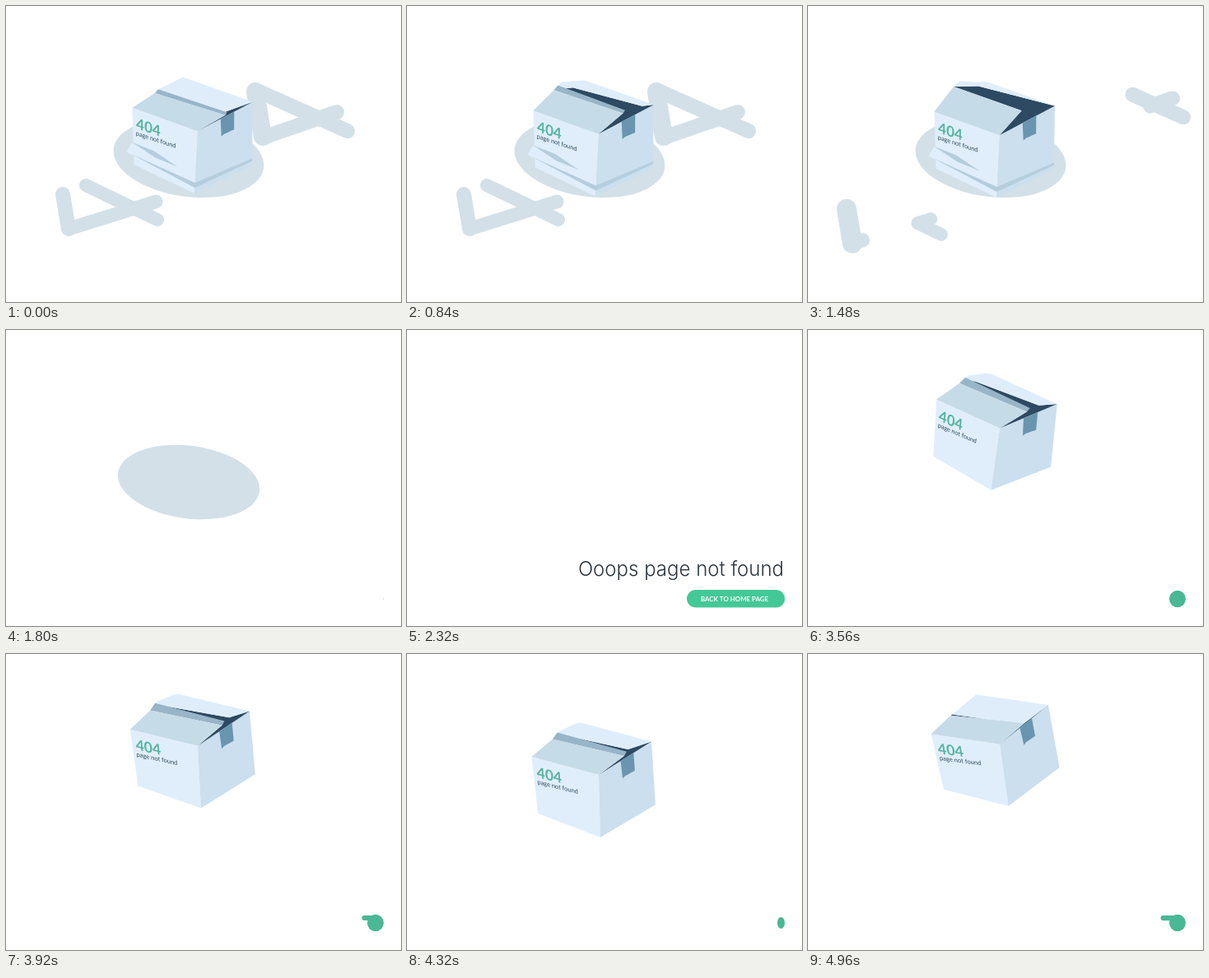
Animation of 480x360 px, one loop 5000 ms. Source, as an HTML page with a canvas:

```html
<!DOCTYPE html>
<html lang="en">
<head>
<meta charset="utf-8">
<title>Page not found</title>
<style>
  html, body { margin: 0; width: 100%; height: 100%; overflow: hidden; background: #fff; }
  canvas { display: block; }
</style>
</head>
<body>
<canvas id="stage" width="480" height="360"></canvas>
<script>
const ctx = document.getElementById('stage').getContext('2d');
const LOOP = 5000, FLOOR = 161, SHADOW = '#d3e0e8';

const clamp = x => Math.max(0, Math.min(1, x));
const span = (t, a, b) => clamp((t - a) / (b - a));
const mix = (a, b, k) => a + (b - a) * k;
const smooth = k => k * k * (3 - 2 * k);

// Smooth interpolation through [time, value] keys
function keyed(keys, t) {
  let i = 1;
  while (i < keys.length - 1 && t > keys[i][0]) i++;
  const [a, b] = [keys[i - 1], keys[i]];
  return mix(a[1], b[1], smooth(span(t, a[0], b[0])));
}

const TILT = [[2320, 6], [2880, -6], [3560, 8], [4140, -8], [4500, 5], [4960, -8], [5000, -8]];
const FLAPS = [[0, .18], [1300, 1], [1760, 1], [2320, .3], [2880, .4], [3560, .6], [4320, .4], [4960, 0]];
const HOPS = [[2880, 3750, 61], [3750, 4358, 61], [4358, 5093, 87]];

function boxHeight(t) {
  if (t < 2880) return 245 * (1 - span(t, 2320, 2880) ** 2);
  const [a, b, top] = HOPS.find(h => t < h[1]);
  const k = span(t, a, b);
  return 4 * top * k * (1 - k);
}

function poly(color, ...points) {
  ctx.fillStyle = color;
  ctx.beginPath();
  points.forEach(p => ctx.lineTo(...p));
  ctx.closePath();
  ctx.fill();
}

function type(text, x, y, font, color) {
  ctx.font = font;
  ctx.fillStyle = color;
  ctx.fillText(text, x, y);
}

// The origin is the top of the box's near edge
function drawBox(x, y, tilt, open, grounded) {
  const left = [-81, -24], near = [0, 0], right = [65, -39], back = [-20, -64];
  const lowLeft = [-75, 45], low = [0, 76], lowRight = [68, 38];
  const wide = open * open, lift = 30 * open - 11 * wide, band = 4 * open * (1 - open);
  const frontL = [-54 - 5 * wide, -43 - 13 * wide], frontR = [33 - 8 * wide, -21 - 10 * wide];
  const backL = [-52 + 23 * open, -44 - 14 * open], backR = [31 + 34 * wide, -20 - lift];
  const outer = [-52 + 5 * band, -44 - lift], corner = [mix(-20, -32, open), -64 + open];

  ctx.save();
  ctx.translate(x, y);
  ctx.rotate(tilt * Math.PI / 180);
  poly('#e0eefb', left, near, low, lowLeft);
  poly('#cbdfee', near, right, lowRight, low);
  if (grounded) {
    poly('#e0eefb', [-79, 18], [-85, 30], [0, 70], [0, 60]);
    poly('#b5cddd', [-79, 18], [-52, 27], [-22, 45], [-50, 35]);
    poly('#b5cddd', [-80, 32], [0, 63], [68, 30], [68, 33], [0, 69]);
  }
  poly('#2e4a62', frontL, frontR, near, right, backR, backL);
  poly('#dfedfb', back, right, backR, backL, frontL, outer, corner);
  poly('#98b5c8', frontL, [frontL[0] + 6 * band, frontL[1] - 8 * band],
    [frontR[0] + 3 * band, frontR[1] - 5 * band], frontR);
  poly('#c6dbe8', left, frontL, frontR, near);
  poly('#6a95ae', [27, -16], [43, -26], [44, -4], [40, -2], [36, 0], [32, 2], [29, 5]);

  ctx.transform(.96, .26, .03, 1, -75, 1);
  ctx.textAlign = 'left';
  type('404', 0, 0, 'bold 18px Lato, sans-serif', '#57b4a0');
  type('page not found', 0, 8, '7.7px Lato, sans-serif', '#2f4a5f');
  ctx.restore();
}

// Part of a thick stroke, from fraction p to fraction q
function stroke([x1, y1], [x2, y2], width, p, q) {
  if (q <= p || width <= 0) return;
  ctx.lineWidth = width;
  ctx.beginPath();
  ctx.moveTo(mix(x1, x2, p), mix(y1, y2, p));
  ctx.lineTo(mix(x1, x2, q), mix(y1, y2, q));
  ctx.stroke();
}

function drawFours(t) {
  const k = span(t, 1200, 1720), gone = clamp(k / .54), thin = 1 - clamp((k - .54) / .44);
  ctx.strokeStyle = SHADOW;
  ctx.lineCap = 'round';

  ctx.save();
  ctx.translate(-41 * k, 33 * k);
  const foot = [76, 271], tip = [182, 238];
  stroke([69, 229], foot, mix(18, 24, gone) * thin, 0, 1);
  stroke(foot, tip, 17 * thin, 0, 1 - .88 * gone);
  if (gone > .1) stroke(foot, tip, 16 * thin, .75 * gone, 1 - .1 * gone);
  stroke([97, 218], [184, 260], 16 * thin, .68 * gone, 1);
  ctx.restore();

  ctx.save();
  ctx.translate(76 * k, -31 * k);
  stroke([303, 104], [312, 159], 22 * thin, gone, 1);
  stroke([303, 102], [415, 152], 18 * thin, .45 * gone, 1);
  stroke([312, 160], [402, 129], 18 * thin, .7 * gone, 1);
  ctx.restore();
}

function zeroPath(scale) {
  ctx.ellipse(222, 185, 92 * scale, 47 * scale, .13, 0, Math.PI * 2);
}

// Circle first, then the pill with its label, then the heading
function drawMessage(level) {
  const size = clamp(level / 31), grow = clamp((level - 46) / 50);
  if (size <= 0) return;
  const rx = 10 * size, ry = 10.3 * Math.sqrt(size);
  ctx.fillStyle = grow > .3 ? '#44c898' : '#4ab795';
  ctx.beginPath();
  ctx.ellipse(459 - rx, 327, rx, ry, 0, 0, Math.PI * 2);
  ctx.fill();
  if (grow > 0) {
    const swell = clamp(grow * 2 - .2);
    const width = 20 + 99 * grow, height = 6 + 15.5 * swell;
    ctx.beginPath();
    ctx.roundRect(459 - width, 318 - 2 * swell, width - 10 * (1 - swell), height, height / 2);
    ctx.fill();
  }
  ctx.save();
  ctx.globalAlpha = clamp((level - 85) / 20);
  ctx.textAlign = 'center';
  type('BACK TO HOME PAGE', 398, 329.5, 'bold 7.9px Lato, sans-serif', '#fff');
  ctx.restore();

  const shown = clamp((level - 100) / 100);
  if (!shown) return;
  ctx.save();
  ctx.beginPath();
  ctx.rect(196, 270, 266 * shown, 40);
  ctx.clip();
  ctx.textAlign = 'right';
  type('Ooops page not found', 458, 299, '300 24px Inter, sans-serif', '#2b3640');
  ctx.restore();
}

function draw(t) {
  ctx.fillStyle = '#fff';
  ctx.fillRect(0, 0, 480, 360);
  const open = keyed(FLAPS, t);

  if (t >= 2320) {
    const height = boxHeight(t);
    drawMessage(height);
    drawBox(233, FLOOR - height, keyed(TILT, t), open, false);
    return;
  }

  if (t < 1720) drawFours(t);
  const hole = 1 - smooth(span(t, 1760, 2040));
  if (hole > 0) {
    ctx.fillStyle = SHADOW;
    ctx.beginPath();
    zeroPath(hole);
    ctx.fill();
  }
  if (t < 1740) {
    const sink = span(t, 1520, 1740);
    ctx.save();
    if (sink > 0) {
      ctx.beginPath();
      ctx.rect(0, 0, 480, 185);
      zeroPath(1);
      ctx.clip();
    }
    drawBox(233, mix(152, 157, smooth(span(t, 0, 1300))) + 170 * sink * sink, 3, open, true);
    ctx.restore();
  }
  drawMessage(245 * span(t, 1800, 2280));
}

const start = performance.now();
function tick() {
  draw((performance.now() - start) % LOOP);
  requestAnimationFrame(tick);
}
tick();
</script>
</body>
</html>
```
